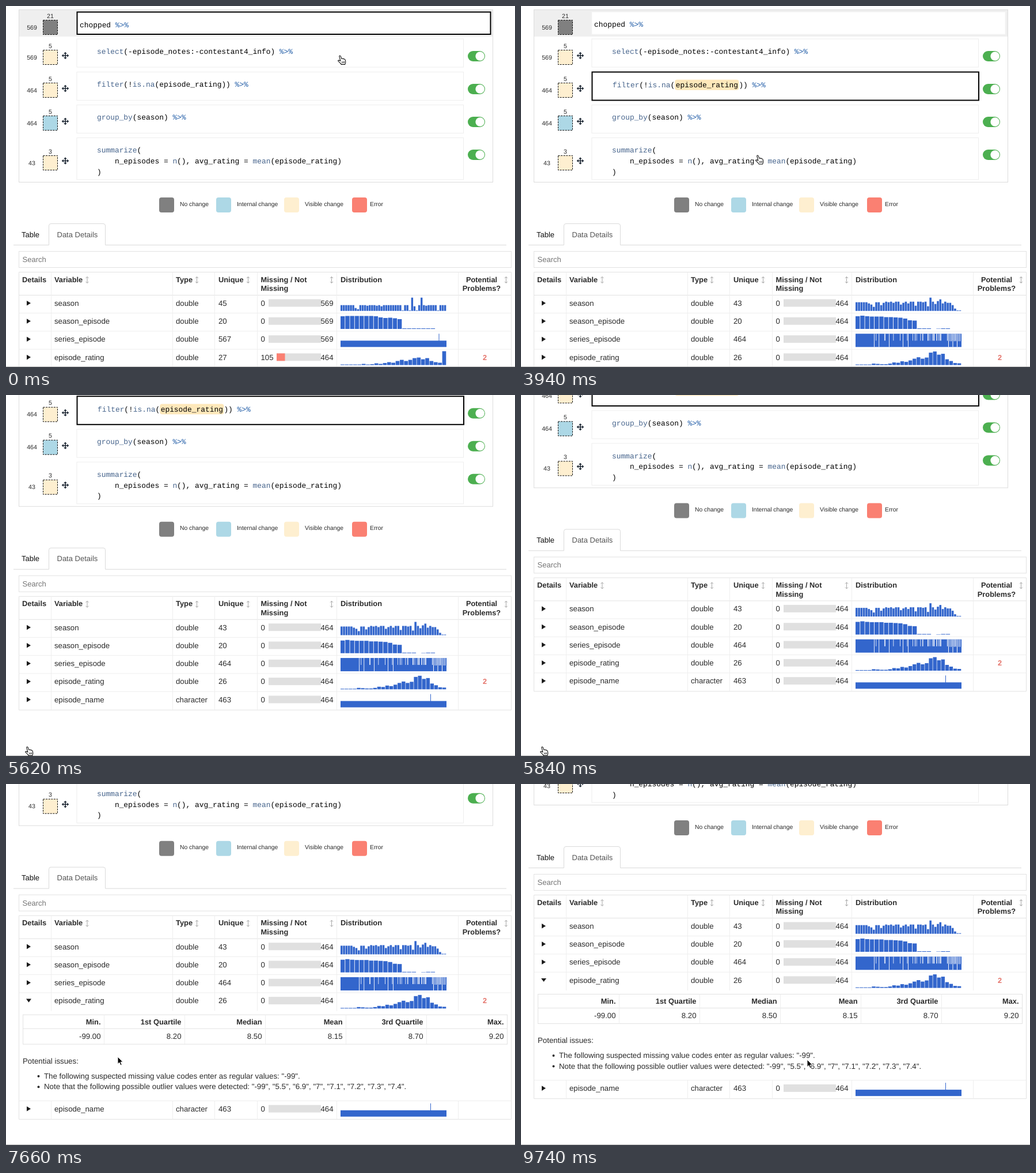
Recreate the animation shown at these times as an HTML page. Size 884x626 px, loop 9760 ms.

```html
<!DOCTYPE html>
<html lang="en">
<head>
<meta charset="utf-8">
<title>Pipeline explorer</title>
<style>
  html, body { margin: 0; width: 100%; height: 100%; overflow: hidden; background: #fff; }
  svg { display: block; width: 884px; height: 626px; }
  text { font-family: "Liberation Sans", Arial, sans-serif; fill: #2b2b2b; white-space: pre; text-rendering: geometricPrecision; }
  .code { font: 12.88px "Liberation Mono", "Courier New", monospace; fill: #000; }
  .fn { fill: #46648c; }
  .pipe { fill: #1f5ba6; }
  .bold { font-weight: bold; font-size: 12.85px; }
</style>
</head>
<body>
<svg id="stage" viewBox="0 0 884 626"></svg>
<script>
const LOOP = 9760;
const CHAR = 7.728;
const BLUE = '#3366cc', SAND = '#feefd0', GREY = '#808080', SKY = '#add8e6', SALMON = '#fa8072';
const LINE = '#e2e2e2', FAINT = '#eeeeee';
const stage = document.getElementById('stage');

function el(parent, tag, attrs, content) {
  const node = document.createElementNS('http://www.w3.org/2000/svg', tag);
  for (const k in attrs) node.setAttribute(k, attrs[k]);
  if (content !== undefined) node.textContent = content;
  parent.appendChild(node);
  return node;
}
const group = parent => el(parent, 'g', {});
const rect = (p, x, y, width, height, fill, more) => el(p, 'rect', { x, y, width, height, fill, ...more });
const path = (p, d, more) => el(p, 'path', { d, ...more });
const line = (p, d, stroke = LINE) => path(p, d, { fill: 'none', stroke });
// y is the middle of the capitals
const text = (p, x, y, size, str, more) => el(p, 'text', { x, y: y + size * 0.35, 'font-size': size, ...more }, str);
const bold = (p, x, y, str, more) => text(p, x, y, 12.85, str, { class: 'bold', ...more });
const MID = { 'text-anchor': 'middle' }, END = { 'text-anchor': 'end' };
const show = (node, on) => node.setAttribute('display', on ? 'inline' : 'none');

const page = group(stage);

/* ---------- pipeline panel ---------- */
rect(page, 22.5, 6.5, 823, 299, '#fff', { stroke: '#dcdcdc' });
rect(page, 23, 7, 822, 46, '#efefef');

const steps = [
  { rows: 569, cols: 21, top: 24, fill: GREY, box: [10.5, 38.5], code: ['chopped %>%'], first: true },
  { rows: 569, cols: 5, top: 76, fill: SAND, box: [57, 49], code: ['select(-episode_notes:-contestant4_info) %>%'] },
  { rows: 464, cols: 5, top: 133, fill: SAND, box: [114.5, 49], code: ['filter(!is.na(episode_rating)) %>%'], hot: 'episode_rating' },
  { rows: 464, cols: 5, top: 190, fill: SKY, box: [171.5, 49], code: ['group_by(season) %>%'] },
  { rows: 43, cols: 3, top: 259, fill: SAND, box: [228.5, 72.5],
    code: ['summarize(', '    n_episodes = n(), avg_rating = mean(episode_rating)', ')'] }
];

function drawCode(p, str, x, y, hot) {
  let shift = 0;
  for (const m of str.matchAll(/%>%|[\w.]+(?=\()|\w+|[^\w\s%]+/g)) {
    const isHot = m[0] === hot;
    const left = x + m.index * CHAR + shift;
    if (isHot) {
      rect(p, left, y - 13.5, hot.length * CHAR + 3, 18, '#fee8ba', { rx: 4 });
      shift += 3;
    }
    const call = str[m.index + m[0].length] === '(' && /\w/.test(m[0]);
    const kind = m[0] === '%>%' ? 'pipe' : call ? 'fn' : '';
    el(p, 'text', { x: left + (isHot ? 1.5 : 0), y, class: 'code ' + kind }, m[0]);
  }
}

function drawStep(s, i) {
  const [y, h] = s.box, w = s.first ? 718 : 671.5;
  text(page, 77, s.top - 7, 10.6, s.cols, MID);
  text(page, 45, s.top + 13, 10.6, s.rows, MID);
  rect(page, 64.5, s.top + 0.5, 25, 25, s.fill, { stroke: '#111', 'stroke-dasharray': '3 1.6' });
  if (!s.first) {
    const cy = s.top + (i === 4 ? 9.5 : 10);
    const icon = path(page, 'M-4 0H4M0 -4V4', { stroke: '#1d2733', 'stroke-width': 1.6, transform: `translate(103 ${cy})` });
    for (let a = 0; a < 360; a += 90)
      path(page, 'M0 -6.3L2.8 -3.2H-2.8Z', { fill: '#1d2733', transform: `translate(103 ${cy}) rotate(${a})` });
    const ty = 30 + i * 57;
    rect(page, 802, ty - 9, 30, 18, '#4caf50', { rx: 9 });
    el(page, 'circle', { cx: 823.2, cy: ty, r: 7.8, fill: '#fff' });
  }
  const x = s.first ? 127 : 158, base = s.first ? 36.3 : 26.3 + i * 57;
  s.off = group(page);
  s.on = group(page);
  rect(s.off, 123, y, w, h, '#fff', { stroke: s.first ? '#f6f6f6' : FAINT });
  rect(s.on, 123.5, y, w, h, '#fff', { stroke: '#000', 'stroke-width': 2 });
  s.code.forEach((str, n) => {
    drawCode(s.off, str, x, base + n * 18.7);
    drawCode(s.on, str, x + 1, base + 1 + n * 18.7, s.hot);
  });
}
steps.forEach(drawStep);

/* ---------- legend, tabs, search ---------- */
[[266, GREY, 302, 'No change'], [365, SKY, 401, 'Internal change'],
 [483, SAND, 519, 'Visible change'], [601, SALMON, 632, 'Error']].forEach(([x, fill, tx, label]) => {
  rect(page, x, 332, 26, 26, fill, { rx: 4 });
  text(page, tx, 343, 10.35, label);
});
line(page, 'M13 414.5H74.5V381Q74.5 377.5 78 377.5H169Q172.5 377.5 172.5 381V414.5H869', '#dadada');
text(page, 27, 396, 13, 'Table', { style: 'fill:#111' });
text(page, 88.5, 396, 13, 'Data Details', { style: 'fill:#555' });
rect(page, 22.5, 425.5, 855, 28, '#fff', { stroke: LINE });
text(page, 28.5, 439.5, 13, 'Search', { style: 'fill:#757575' });

/* ---------- data table ---------- */
const EDGES = [22.5, 78.5, 289.5, 362.5, 436.5, 574.5, 785.5, 877.5];
const rowY = i => 515.2 + i * 31.3;

line(page, 'M22.5 461.5H877.5M22.5 501.5H877.5');
bold(page, 28, 474.2, 'Details');
bold(page, 84, 474.2, 'Variable');
bold(page, 295, 474.2, 'Type');
bold(page, 369, 474.2, 'Unique');
bold(page, 442.5, 474.2, 'Missing / Not');
bold(page, 442.5, 490, 'Missing');
bold(page, 581, 474.2, 'Distribution');
bold(page, 826, 474.2, 'Potential', MID);
bold(page, 826, 490, 'Problems?', MID);
for (const x of [141, 331.5, 420.5, 565.5, 868.5])
  line(page, `M${x} 469.5V480.5M${x - 2.5} 472L${x} 469.5L${x + 2.5} 472M${x - 2.5} 478L${x} 480.5L${x + 2.5} 478`, '#a8a8a8');
EDGES.forEach((x, i) => line(page, `M${x} 461.5V627`, i % 7 ? FAINT : LINE));
for (let i = 1; i < 4; i++) line(page, `M22.5 ${501.3 + i * 31.3}H877.5`, FAINT);

function bars(p, heights, bottom, gap, extent = 184) {
  const step = extent / heights.length;
  heights.forEach((h, i) => rect(p, 581 + i * step, bottom - h, step - gap, h, BLUE));
}
function flatBars(p, bottom, spike) {
  rect(p, 581, bottom - 11, 184, 11, BLUE);
  rect(p, spike, bottom - 23, 1, 13, BLUE);
}
function denseBars(p, bottom) {
  rect(p, 581, bottom - 23, 184, 23, BLUE);
  let seed = 11;
  const rnd = () => (seed = seed * 16807 % 2147483647) / 2147483647;
  for (const x of [613, 621.3, 639, 663, 672]) rect(p, x, bottom - 23, 0.9, 23, '#fff');
  for (let i = 0; i < 34; i++) rect(p, 615 + 148 * Math.sqrt(rnd()), bottom - 23, 0.8, 12, '#fff');
  for (let i = 0; i < 9; i++) rect(p, 742 + i * 2.5, bottom - 23, 1, i % 3 ? 13 : 23, '#fff');
}

const names = ['season', 'season_episode', 'series_episode', 'episode_rating', 'episode_name'];
const full = {
  rows: 569, unique: [45, 20, 567, 27],
  season: [10, 10, 10, 10, 10, 10, 5, 3, 10, 10, 10, 9, 10, 10, 10, 9, 10, 8, 10, 10, 10, 10, 10, 10, 10, 10, 1, 10, 10, 1,
    23, 8, 1, 10, 23, 10, 9, 10, 10, 10, 10, 1, 10, 10, 10],
  episode: [22, 22.5, 22.5, 22.5, 22.5, 22.5, 22.5, 22, 20, 19, 19.5, 18.5, 17, 1, 1, 1, 1, 1, 1, 1],
  rating: [1, 1, 1, 1, 1, 2, 1, 1.5, 3, 2, 3.5, 5, 4, 7, 9, 7, 9, 12, 13, 10, 12, 7, 5, 4, 24]
};
const filtered = {
  rows: 464, unique: [43, 20, 464, 26, 463],
  season: [15, 15, 15, 15, 15, 13, 11, 7, 15, 15, 10, 14, 16, 15, 16, 14, 16, 16, 11, 14, 16, 13, 16, 16, 9, 16, 16, 15, 16, 8,
    23, 16, 12, 17, 20, 13, 16, 14, 14, 10, 4, 1, 1],
  episode: [22, 23, 22, 21.5, 21.5, 21.5, 20.5, 20.5, 20, 19.5, 18, 15, 14.5, 1, 1, 1, 0, 0.5, 1, 1],
  rating: [1, 1, 1, 1, 2.5, 2, 1.5, 1.5, 2.5, 4.5, 4, 6.5, 5.5, 8, 11, 13.5, 11, 13, 21.5, 23.5, 18, 19.5, 10, 7, 3.5, 3]
};

function drawRow(p, data, i) {
  const y = rowY(i), bottom = y + 13.5;
  const missing = i === 3 ? 569 - data.rows === 0 ? 105 : 0 : 0;
  text(p, 84, y, 13.2, names[i]);
  text(p, 295, y, 13.2, i === 4 ? 'character' : 'double');
  text(p, 369, y, 13.2, data.unique[i]);
  text(p, 442.5, y, 13.2, missing);
  const left = missing ? 470 : 456;
  rect(p, left, y - 6.7, 547 - left, 13, '#e0e0e0');
  if (missing) rect(p, left, y - 6.7, 14.5, 13, SALMON);
  text(p, 568.5, y, 13.2, data.rows - missing, END);
  if (i === 0) bars(p, data.season, bottom, 0.7);
  if (i === 1) bars(p, data.episode, bottom, 0.9, 165);
  if (i === 2) data === full ? flatBars(p, bottom, 751.5) : denseBars(p, bottom);
  if (i === 3) bars(p, data.rating, bottom, 0.7);
  if (i === 4) flatBars(p, bottom, 737);
  if (i === 3) bold(p, 831.5, y, '2', { ...MID, style: 'fill:#e4736a' });
}
for (const data of [full, filtered]) {
  data.node = group(page);
  for (let i = 0; i < 4; i++) drawRow(data.node, data, i);
}

const triangle = (p, y) => path(p, `M36 ${y - 4.3}L43 ${y}L36 ${y + 4.3}Z`, { fill: '#1c1c1c' });
for (let i = 0; i < 3; i++) triangle(page, rowY(i));
const closed = group(page);
triangle(closed, rowY(3));

/* ---------- expanded details ---------- */
const open = group(page);
path(open, `M35 ${rowY(3) - 3.2}H44L39.5 ${rowY(3) + 3}Z`, { fill: '#1c1c1c' });
rect(open, 23, 627, 854, 155, '#fff');
line(open, 'M22.5 626V783M877.5 626V783');
rect(open, 29.5, 633.5, 841, 51, '#fff', { stroke: LINE });
line(open, 'M29.5 657.5H870.5');
[['Min.', '-99.00'], ['1st Quartile', '8.20'], ['Median', '8.50'],
 ['Mean', '8.15'], ['3rd Quartile', '8.70'], ['Max.', '9.20']].forEach(([head, value], i) => {
  const x = 30.5 + 140 * (i + 1);
  bold(open, x - 6, 645.7, head, END);
  text(open, x - 6, 670.7, 13.2, value, END);
  if (i < 5) line(open, `M${x} 633.5V684.5`, FAINT);
});
text(open, 29, 713.7, 13.3, 'Potential issues:');
['The following suspected missing value codes enter as regular values: "-99".',
 'Note that the following possible outlier values were detected: "-99", "5.5", "6.9", "7", "7.1", "7.2", "7.3", "7.4".'
].forEach((str, i) => {
  const y = 739.5 + i * 18.6;
  el(open, 'circle', { cx: 56.5, cy: y + 0.5, r: 2, fill: '#2b2b2b' });
  text(open, 66, y, 13.3, str);
});

const last = group(page);
drawRow(last, filtered, 4);
triangle(last, rowY(4));
line(last, 'M22.5 626.5H877.5', FAINT);
line(last, 'M22.5 658.5H877.5');
EDGES.forEach((x, i) => line(last, `M${x} 626.5V658.5`, i % 7 ? FAINT : LINE));

/* ---------- fixed footer line and pointer ---------- */
line(stage, 'M0 625.5H884', '#bdbdbd');
const hand = group(stage);
path(hand, 'M-1.2 1.2Q-1 0 0.2 0.2Q1.2 0.4 1.6 1.8L2.8 5.4Q4.2 4.4 5 5.6Q6.4 4.8 7.1 6.2Q8.8 5.8 9.2 7.6L9.8 11Q9.8 13 8.6 15.4H2.4Q1 13 -2 10.6Q-4 8.8 -3 8.2Q-1.6 7.8 0.9 9.3Z',
  { fill: '#fff', stroke: '#111', 'stroke-width': 1.1, 'stroke-linejoin': 'round' });
line(hand, 'M3.6 10.2V13.2M5.6 10V13.2M7.5 9.8V13', '#333');
const arrow = group(stage);
path(arrow, 'M0 0V12.6L2.9 9.9L5 14.8L7.2 13.9L5.1 9.1H9Z', { fill: '#000', stroke: '#fff', 'stroke-width': 1 });

/* ---------- timeline ---------- */
const track = [
  [0, 580, 86], [1240, 580, 86], [1520, 574, 136], [3280, 574, 136], [3660, 415, 255],
  [3880, 415, 255], [4880, 37, 610], [5990, 37, 610], [6500, 37, 448], [6800, 37, 448],
  [7240, 194, 473], [7740, 194, 473], [8460, 531, 476], [8740, 531, 476],
  [9160, 640, 477], [9660, 498, 474], [9740, 497, 478], [LOOP, 497, 478]
];
function pointerAt(t) {
  const i = Math.max(1, track.findIndex(k => k[0] > t));
  const [ta, xa, ya] = track[i - 1], [tb, xb, yb] = track[i];
  const u = (t - ta) / (tb - ta), e = u * u * (3 - 2 * u);
  return [xa + (xb - xa) * e, ya + (yb - ya) * e];
}

// momentum scroll: quick start, long decay
function glide(t, start, decay) {
  const s = (t - start) / 1000, rise = 25;
  if (s <= 0) return 0;
  return 1 - (rise * Math.exp(-decay * s) - decay * Math.exp(-rise * s)) / (rise - decay);
}
const scrollAt = t => 157.5 * glide(t, 5357, 5.7) + 111.5 * glide(t, 7450, 6.9);

function draw(t) {
  const chosen = t < 20 ? 0 : t < 1840 ? 1 : 2;
  steps.forEach((s, i) => {
    show(s.on, i === chosen);
    show(s.off, i !== chosen);
  });
  show(full.node, t < 2180);
  show(filtered.node, t >= 2180);
  const expanded = t >= 6760;
  show(open, expanded);
  show(closed, !expanded);
  last.setAttribute('transform', `translate(0 ${expanded ? 156.2 : 0})`);
  page.setAttribute('transform', `translate(0 ${(-scrollAt(t)).toFixed(2)})`);

  const [x, y] = pointerAt(t);
  const pointing = t < 6860 && (y < 294 || x < 70);
  show(hand, pointing);
  show(arrow, !pointing);
  (pointing ? hand : arrow).setAttribute('transform', `translate(${x.toFixed(2)} ${y.toFixed(2)})`);
}

const begin = performance.now();
function tick() {
  draw((performance.now() - begin) % LOOP);
  requestAnimationFrame(tick);
}
tick();
</script>
</body>
</html>
```
